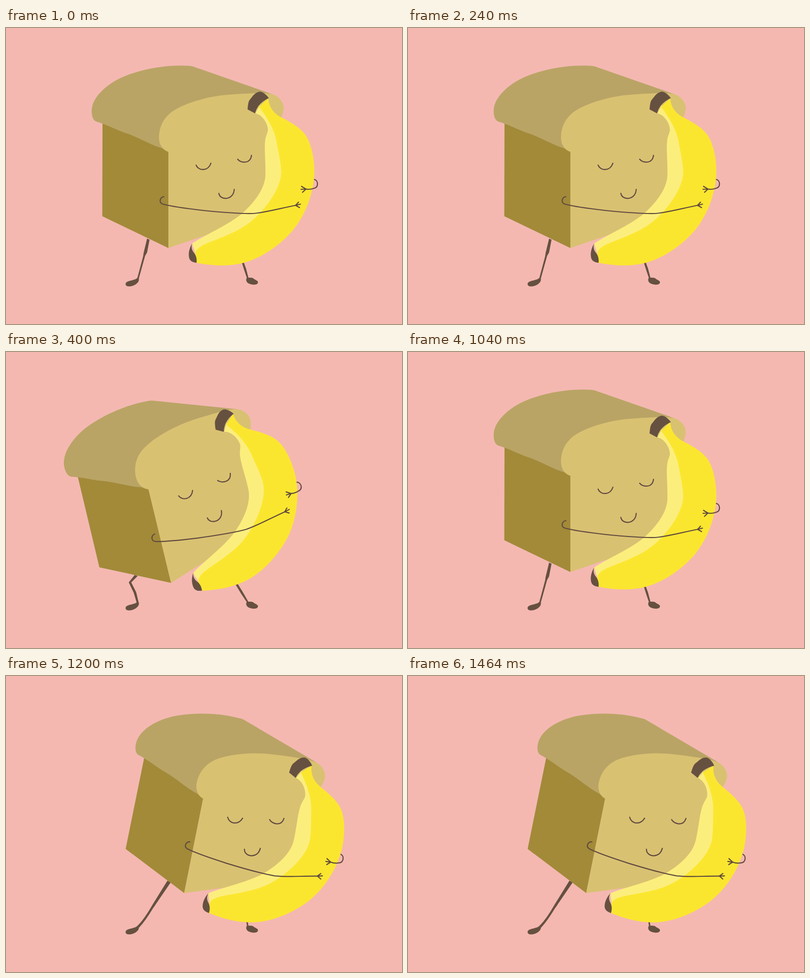
Recreate the animation shown at these times as an HTML page. Size 800 px wide and 600 px high, loop 1.64 s.

```html
<!DOCTYPE html>
<html lang="en">
<head>
<meta charset="utf-8">
<title>Bread hugging a banana</title>
<style>
  html, body { margin: 0; width: 100%; height: 100%; overflow: hidden; background: #f4b8b1; }
  svg { display: block; width: 100%; height: 100%; }
  .limb { fill: #665040; }
  .line { fill: none; stroke: #604a3e; stroke-width: 2.2; stroke-linecap: round; stroke-linejoin: round; }
</style>
</head>
<body>
<svg viewBox="0 0 800 600">
  <g class="limb">
    <path id="leftLeg"/>
    <path id="rightLeg"/>
    <path d="M266 506C260 513 242 511 241.500 519C242 527 258 524 264 518C269 514 269 510 268 507Z"/>
    <path d="M486 507C484 512 486 517 493 519C500 521 508 521 509 516C510 512 503 511 499 507Q493 505 486 507Z"/>
  </g>

  <g id="body">
    <!-- bread -->
    <path fill="#a28a39" d="M195 190L328 246V446L194.500 381.500Z"/>
    <path fill="#b9a465" d="M182 189.500C172 185 171 165 176 153C186 128 215 107 244 96C281 82 325 74.500 364 76.500Q374 76 382 79.500L515 126L540 135L400 200L328 251L316 244C290 236 270 223 245 214C225 208 205 196 182 189.500Z"/>
    <path fill="#d9c172" d="M328 251C316 247 309 236 309 222C309 205 315 189 327 177C345 158 395 141 440 136C470 133 495 133 515 131L538 134C552 139 560 149 561 161Q561 172 555 183L540 300L480 394L328 446Z"/>

    <!-- banana -->
    <path fill="#fcee7d" d="M504 173C517 176 527 190 529 204C530 210 526 215 524 225C521 245 525 270 524 300C522 330 497 358 476 377C445 402 400 420 376 437L383 458L470 440L580 300L530 150L512 158Z"/>
    <path fill="#fbe62f" d="M530 142C530 158 540 173 556 181C575 191 597 203 607 220C619 240 623 270 623 292C622 333 606 379 578 412C549 445 511 468 480 476C450 484 415 482 385 476L382 457C385 446 394 441 417 432C433 426 449 419 464 412C485 402 504 386 517 371C540 345 556 315 556 292C556 275 550 250 546 227C540 200 524 176 511 160Z"/>
    <g class="limb">
      <path d="M500 136Q507 129 514 129Q523 131 531 142Q518 148 510 158Q505 165 503 173L488 165Q489 150 492 146Z"/>
      <path d="M376 437C370 447 368 457 370 466C372 473 378 475 385 476C386 468 384 461 380 456C375 450 374 444 376 437Z"/>
    </g>

    <!-- face and arms -->
    <g class="line">
      <path d="M384 278C389 290 408 291 414 274"/>
      <path d="M468 266C474 274 494 276 496 258"/>
      <path d="M430 335C432 350 460 350 461 327"/>
      <path d="M319 342C311 343 308 354 317 357C335 362 365 366 400 370C430 373 470 377 500 376C530 373 555 365 588 359"/>
      <path d="M591 353L585 359.500L595 357M585 359.500L593 364"/>
      <path d="M623 307C631 309 632 323 622 325Q614 328 606 326.500"/>
      <path d="M597 321L606 326.500L596 327M606 326.500L599 333"/>
    </g>
  </g>
</svg>
<script>
const byId = id => document.getElementById(id);

// The hug is rigid: it turns about the loaf's front bottom corner (328, 446).
const upright = {
  x: 328, y: 446, turn: 0,
  left: "M285 427L290 429L285 455L281 462L268 509L265 508L277 463L278 456Z",
  right: "M476 474L480 474L485 488L490 507L487 508L481 490Z"
};
const leanBack = {
  x: 333.5, y: 468, turn: -13.5,
  left: "M260 452L266 454L253 467L263 487L268 508L264 508L258 488L248 467Z",
  right: "M463 470L468 470L478 486L490 507L487 508L475 490Z"
};
const leanForward = {
  x: 360, y: 440, turn: 11.3,
  left: "M326 415L333 418L303 462C300 467 297 470 295 474C287 487 279 499 269 510L265 507C277 495 285 482 291 472L297 462Z",
  right: "M485 496L488 496L490 507L487 508Z"
};

const poses = [upright, leanBack, upright, leanForward];
const step = 400, loop = 1640;

function draw(now) {
  const index = Math.min(Math.floor((now % loop) / step), poses.length - 1);
  const { x, y, turn, left, right } = poses[index];
  byId("body").setAttribute("transform", `translate(${x} ${y}) rotate(${turn}) translate(-328 -446)`);
  byId("leftLeg").setAttribute("d", left);
  byId("rightLeg").setAttribute("d", right);
}

const start = performance.now();
function tick() {
  draw(performance.now() - start);
  requestAnimationFrame(tick);
}
tick();
</script>
</body>
</html>
```
